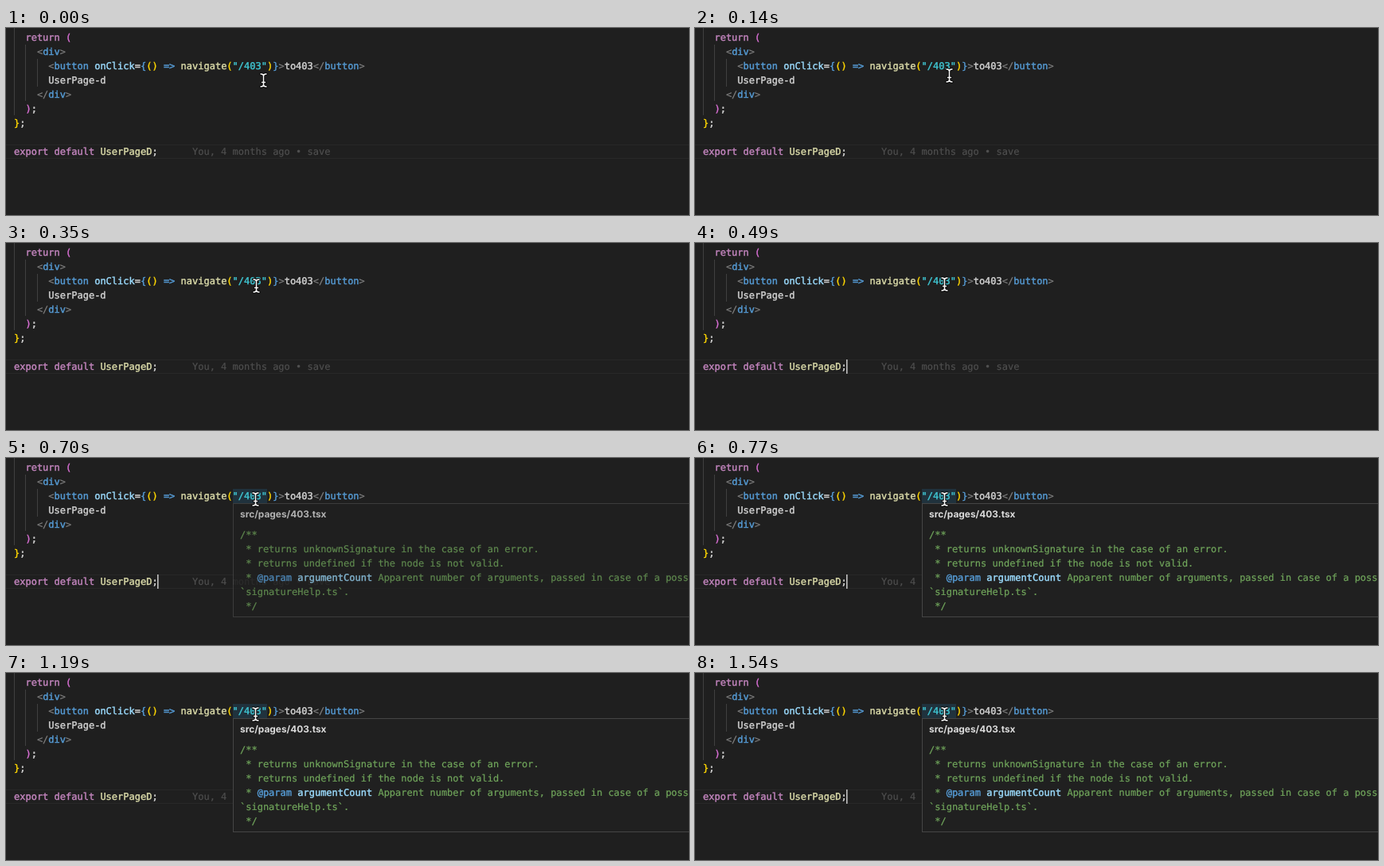
An HTML page that plays this animation: 858x236 px, repeating every 1820 ms.

```html
<!DOCTYPE html>
<html lang="en">
<head>
<meta charset="utf-8">
<title>Editor hover</title>
<style>
  html, body { margin: 0; width: 100%; height: 100%; overflow: hidden; background: #1f1f1f; }
  svg { display: block; width: 858px; height: 236px; }
  text { white-space: pre; font: 12px "DejaVu Sans Mono", monospace; text-rendering: geometricPrecision; }
  .title { font: 700 11.9px Inter, sans-serif; fill: #dcdcdc; }
  .blame { fill: #505050; stroke: #505050; stroke-width: .15px; }
</style>
</head>
<body>
<svg viewBox="0 0 858 236">
  <defs>
    <path id="beam" d="M-3.5-8Q0-8 0-5.5Q0-8 3.5-8M0-5.5V5.5M-3.5 8Q0 8 0 5.5Q0 8 3.5 8M-2 2.5H2"/>
  </defs>
  <rect width="858" height="236" fill="#1f1f1f"/>
  <path d="M0 147.5H858M0 164.5H858" stroke="#282828"/>
  <path d="M10.5 0V110M24.5 21V92M39.5 39V74" stroke="#404040"/>
  <rect id="highlight" x="285" y="39" width="43" height="18" fill="#20323d"/>
  <g id="code"></g>
  <text class="blame" x="234" y="160">You, 4 months ago • save</text>
  <rect id="caret" x="190" y="147" width="1.6" height="18" fill="#c0c0c0"/>
  <g id="popup">
    <rect x="285.5" y="57.5" width="600" height="143" fill="#202020" stroke="#454545"/>
    <text class="title" x="294" y="75">src/pages/403.tsx</text>
    <g id="doc"></g>
  </g>
  <g id="pointer" fill="none" stroke-linecap="round">
    <use href="#beam" stroke="#000" stroke-width="3.4"/>
    <use href="#beam" stroke="#fff" stroke-width="1.5"/>
  </g>
</svg>
<script>
const LOOP = 1820, STEP = 70, ROW = 18, CHAR = 7.224;
const NS = "http://www.w3.org/2000/svg";
const $ = id => document.getElementById(id);

const color = {
  key: "#c586c0", pink: "#da70d6", gold: "#ffd700", blue: "#569cd6", attr: "#9cdcfe",
  fn: "#dcdcaa", str: "#3fc6d3", grey: "#808080", text: "#d4d4d4", note: "#70a55b"
};

// Each line is [row, indent, color, text, color, text, ...].
function addLine(parent, x, y, [row, indent, ...parts]) {
  const text = document.createElementNS(NS, "text");
  text.setAttribute("x", x + indent * CHAR);
  text.setAttribute("y", y + row * ROW);
  for (let i = 0; i < parts.length; i += 2) {
    const span = document.createElementNS(NS, "tspan");
    const name = parts[i];
    span.setAttribute("fill", color[name]);
    span.setAttribute("stroke", color[name]);
    span.setAttribute("stroke-width", name === "note" || name === "grey" ? .2 : .4);
    span.textContent = parts[i + 1];
    text.append(span);
  }
  parent.append(text);
}

[
  [0, 2, "key", "return ", "pink", "("],
  [1, 4, "grey", "<", "blue", "div", "grey", ">"],
  [2, 6, "grey", "<", "blue", "button ", "attr", "onClick", "text", "=", "blue", "{",
    "gold", "()", "blue", " => ", "fn", "navigate", "gold", "(", "str", '"/403"',
    "gold", ")", "blue", "}", "grey", ">", "text", "to403", "grey", "</", "blue", "button", "grey", ">"],
  [3, 6, "text", "UserPage-d"],
  [4, 4, "grey", "</", "blue", "div", "grey", ">"],
  [5, 2, "pink", ")", "text", ";"],
  [6, 0, "gold", "}", "text", ";"],
  [8, 0, "key", "export default ", "fn", "UserPageD", "text", ";"]
].forEach(line => addLine($("code"), 10, 16, line));

[
  [0, 0, "note", "/**"],
  [1, 1, "note", "* returns unknownSignature in the case of an error."],
  [2, 1, "note", "* returns undefined if the node is not valid."],
  [3, 1, "note", "* ", "blue", "@param ", "attr", "argumentCount ",
    "note", "Apparent number of arguments, passed in case of a poss"],
  [4, 0, "note", "`signatureHelp.ts`."],
  [5, 1, "note", "*/"]
].forEach(line => addLine($("doc"), 294, 101, line));

function render(time) {
  const t = Math.floor((time % LOOP) / STEP) * STEP;
  const left = (1 - Math.min(t / 490, 1)) ** 1.55;
  const x = Math.round(313 + 10 * left) + .5;
  const y = Math.round(52 + 14 * left);
  $("pointer").setAttribute("transform", `translate(${x} ${y})`);
  $("caret").setAttribute("opacity", (t >= 490 && t < 1050) || t >= 1540 ? 1 : 0);
  $("highlight").setAttribute("opacity", t >= 700 ? 1 : 0);
  $("popup").setAttribute("opacity", t < 700 ? 0 : t < 770 ? .78 : 1);
}

const start = performance.now();
function tick() {
  render(performance.now() - start);
  requestAnimationFrame(tick);
}
render(0);
requestAnimationFrame(tick);
</script>
</body>
</html>
```
